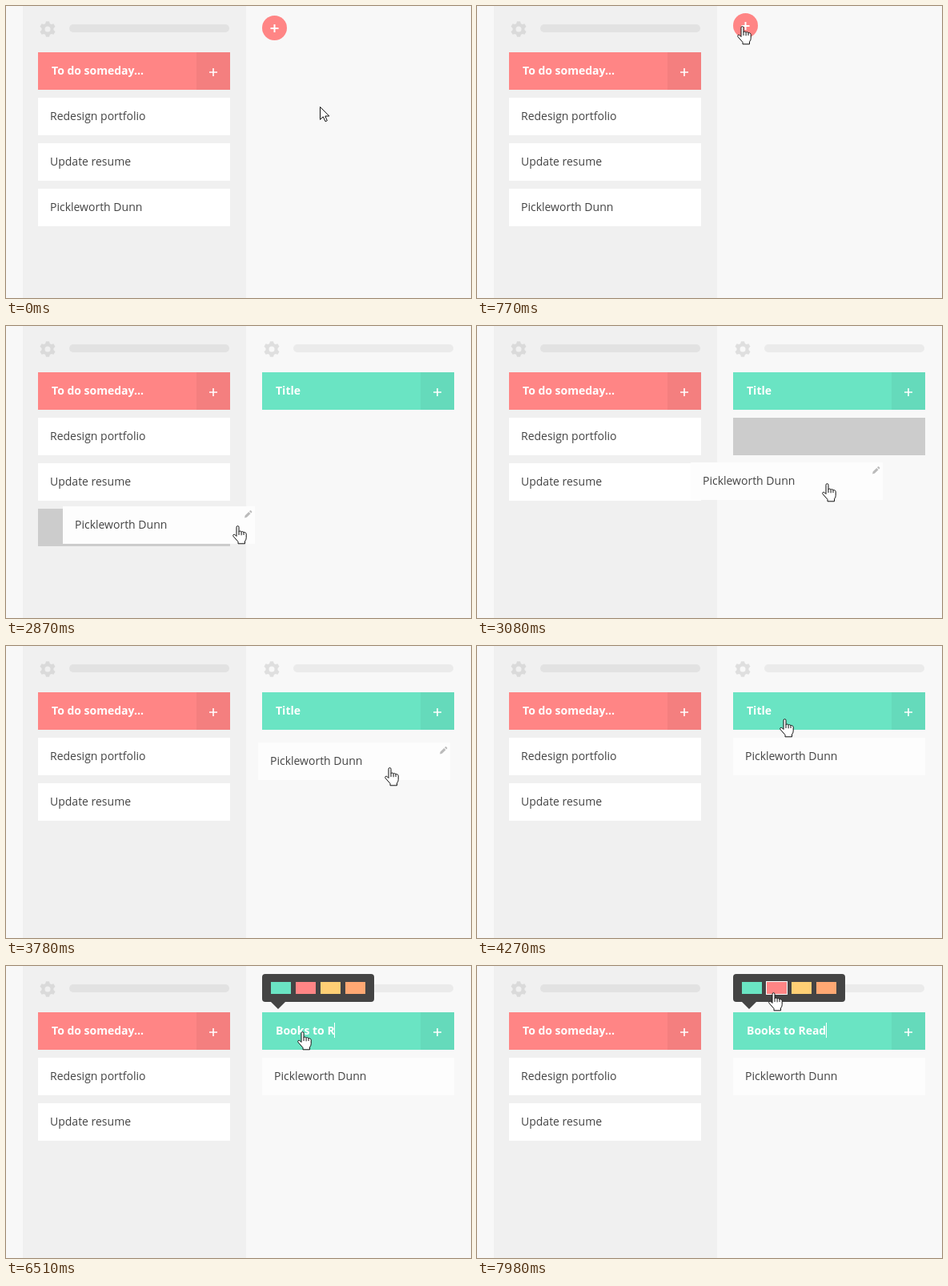
These frames come from a looping animation (581 by 366 pixels, 8 s). An HTML page:

```html
<!DOCTYPE html>
<html lang="en">
<head>
<meta charset="utf-8">
<title>Task board</title>
<style>
html, body { margin: 0; width: 100%; height: 100%; overflow: hidden; background: #f8f8f8; }
svg { display: block; }
text { font: 14px "Open Sans", sans-serif; fill: #444; white-space: pre; }
.head { font-weight: 700; fill: #fff; }
</style>
</head>
<body>
<svg id="stage" width="581" height="366" viewBox="0 0 581 366"></svg>
<script>
const LOOP = 8000, STEP = 70;
const RED = '#ff8585', GREEN = '#6ae4c3';
const GRAB = { x: 164, y: 31 };
const stage = document.getElementById('stage');
const $ = id => document.getElementById(id);

// Six-tooth gear around the origin
function gearPath() {
  const polar = (deg, r) => {
    const a = deg * Math.PI / 180;
    return (r * Math.sin(a)).toFixed(2) + ' ' + (-r * Math.cos(a)).toFixed(2);
  };
  const pts = [];
  for (let a = 0; a < 360; a += 60) {
    pts.push(polar(a - 22.5, 7.5), polar(a - 11.5, 10), polar(a + 11.5, 10), polar(a + 22.5, 7.5));
  }
  return 'M' + pts.join('L') + 'ZM3.5 0A3.5 3.5 0 1 0 -3.5 0A3.5 3.5 0 1 0 3.5 0Z';
}

const rect = (x, y, w, h, fill, more = '') =>
  `<rect x="${x}" y="${y}" width="${w}" height="${h}" fill="${fill}" ${more}/>`;

const plus = (x, y, width) =>
  `<path d="M${x - 5} ${y}h10m-5 -5v10" stroke="#fff" stroke-width="${width}"/>`;

const column = (x, color, bar, gear, label) => `
  <path class="gear" d="${gearPath()}" transform="translate(${x + 12} 29)" fill="${gear}" fill-rule="evenodd"/>
  ${rect(x + 39, 23, 200, 10, bar, 'rx="5"')}
  ${rect(x, 58, 240, 47, color)}
  ${rect(x + 198, 58, 42, 47, '#000', 'opacity=".045"')}
  ${plus(x + 219, 83, 1.6)}
  ${label}`;

const heading = (x, title, id = '') => `<text ${id} class="head" x="${x}" y="86">${title}</text>`;

const card = (label, attrs, extra = '') => `
  <g ${attrs}>${rect(0, 0, 240, 47, '#fff')}<text x="15" y="28">${label}</text>${extra}</g>`;

const pencil = `<path id="pencil" transform="translate(227 5)" fill="#bbb"
  d="M0 9.5l.7-2.9 4.6-4.6 2.2 2.2-4.6 4.6zM6 1.3l1-1q.5-.4 1 0l1.2 1.2q.4.5 0 1l-1 1z"/>`;

const swatches = [GREEN, RED, '#ffcf75', '#ffa873']
  .map((c, i) => rect(331 + 31 * i, 20, 25, 15, c)).join('');

const titleParts = rect(337, 71, 31, 19, '#59cbac', 'id="selection"') +
  heading(337, 'Title', 'id="title"');

stage.innerHTML = `
  ${rect(0, 0, 581, 366, '#f8f8f8')}
  ${rect(21, 0, 279, 366, '#f0f0f0')}
  ${column(40, RED, '#e2e2e2', '#dadada', heading(57, 'To do someday...'))}
  ${card('Redesign portfolio', 'transform="translate(40 115)"')}
  ${card('Update resume', 'transform="translate(40 172)"')}
  <g id="button"><circle cx="335.5" cy="27.5" r="15.5" fill="${RED}"/>${plus(335.5, 28, 2)}</g>
  <g id="added">${column(320, GREEN, '#ebebeb', '#dfdfdf', titleParts)}</g>
  ${rect(0, 0, 1, 19, '#fff', 'id="caret"')}
  ${rect(0, 0, 240, 47, '#ccc', 'id="slot"')}
  ${card('Pickleworth Dunn', 'id="book"', pencil)}
  <g id="popup">
    ${rect(320, 10, 140, 35, '#444', 'rx="4"')}
    <path d="M330 44h20l-10 10z" fill="#444"/>
    ${swatches}
    <rect id="ring" x="361.5" y="19.5" width="26" height="16" fill="none" stroke="#fff"/>
  </g>
  <g id="cursor" stroke="#111" stroke-linejoin="round" fill="#fff">
    <path id="arrow" d="M.5.5V16.4L4.3 12.8 7 18.7 9.3 17.7 6.8 12H11.8Z"/>
    <g id="hand" transform="translate(-6 0)">
      <path d="M5 13.5V2.3Q5 .6 6.5 .6T8 2.3V8Q8.2 7 9.5 7T11.1 8.3Q11.3 7.6 12.5 7.6T14 9Q14.3 8.5 15.4 8.6T17.2 10.5V15.5Q17.2 17.8 15.5 19.8V22.8H7V20.4L1.2 13.8Q.2 12.2 1.2 11.5T3.6 12Z"/>
      <path d="M8 8v4M11.1 8.3v4M14 9v3" fill="none"/>
    </g>
  </g>`;

// Pointer moves: start, end, x, y at the end; it rests in between
const moves = [
  [490, 630, 441, 75], [630, 770, 331, 25],
  [1820, 2380, 205, 260],
  [2660, 2800, 235, 257], [2800, 2870, 289, 250], [2870, 3010, 431, 202],
  [3010, 3080, 437, 197], [3080, 3430, 479, 152],
  [3780, 4340, 370, 82],
  [7630, 7980, 370, 33]
];

function pointer(t) {
  let x = 392, y = 126;
  for (const [from, to, toX, toY] of moves) {
    const p = Math.min(1, Math.max(0, (t - from) / (to - from)));
    x += (toX - x) * p;
    y += (toY - y) * p;
  }
  return [Math.round(x), Math.round(y)];
}

// Each word starts at its own time and is typed at an even pace
const PACE = 96;
const words = [[5530, 'Books '], [6160, 'to '], [6510, 'Read']];
const typedAt = t => words
  .map(([from, word]) => word.slice(0, Math.max(0, Math.floor((t - from) / PACE) + 1)))
  .join('');

const show = (id, on) => $(id).setAttribute('visibility', on ? 'visible' : 'hidden');
const place = (id, x, y) => $(id).setAttribute('transform', `translate(${x} ${y})`);

// The dragged card follows the pointer one step late
function bookAt(t) {
  if (t < 2730) return [40, 229];
  if (t >= 3850) return [320, 115];
  const [x, y] = pointer(t - STEP);
  return [x - GRAB.x, y - GRAB.y];
}

function draw(time) {
  const t = Math.floor(time / STEP) * STEP;
  const [x, y] = pointer(t);
  const within = (from, to) => t >= from && t < to;

  const arrow = t < 770 || within(1890, 2100);
  place('cursor', x, y);
  show('arrow', arrow);
  show('hand', !arrow);

  show('button', t < 1470);
  place('button', 0, t >= 770 ? -3 : 0);
  show('added', t >= 1470);
  $('added').querySelector('.gear').setAttribute('fill', t < 1890 ? '#a0a3a2' : '#dfdfdf');

  place('book', ...bookAt(t));
  $('book').firstElementChild.setAttribute('fill', t < 2730 ? '#fff' : '#fdfdfd');
  show('pencil', within(2240, 3920));
  show('slot', within(2730, 3780));
  if (t < 3010) place('slot', 40, 229);
  else place('slot', 320, 115);

  show('popup', t >= 4550);
  $('popup').setAttribute('opacity', t < 4620 ? .5 : 1);
  show('ring', t >= 4550 && y < 36);

  const typed = typedAt(t), title = $('title');
  show('selection', t >= 4550 && !typed);
  title.textContent = typed || 'Title';
  show('caret', typed && !within(7070, 7560));
  if (typed) place('caret', Math.floor(337 + title.getComputedTextLength()), 71);
}

const start = performance.now();
function tick() {
  draw((performance.now() - start) % LOOP);
  requestAnimationFrame(tick);
}
tick();
</script>
</body>
</html>
```
